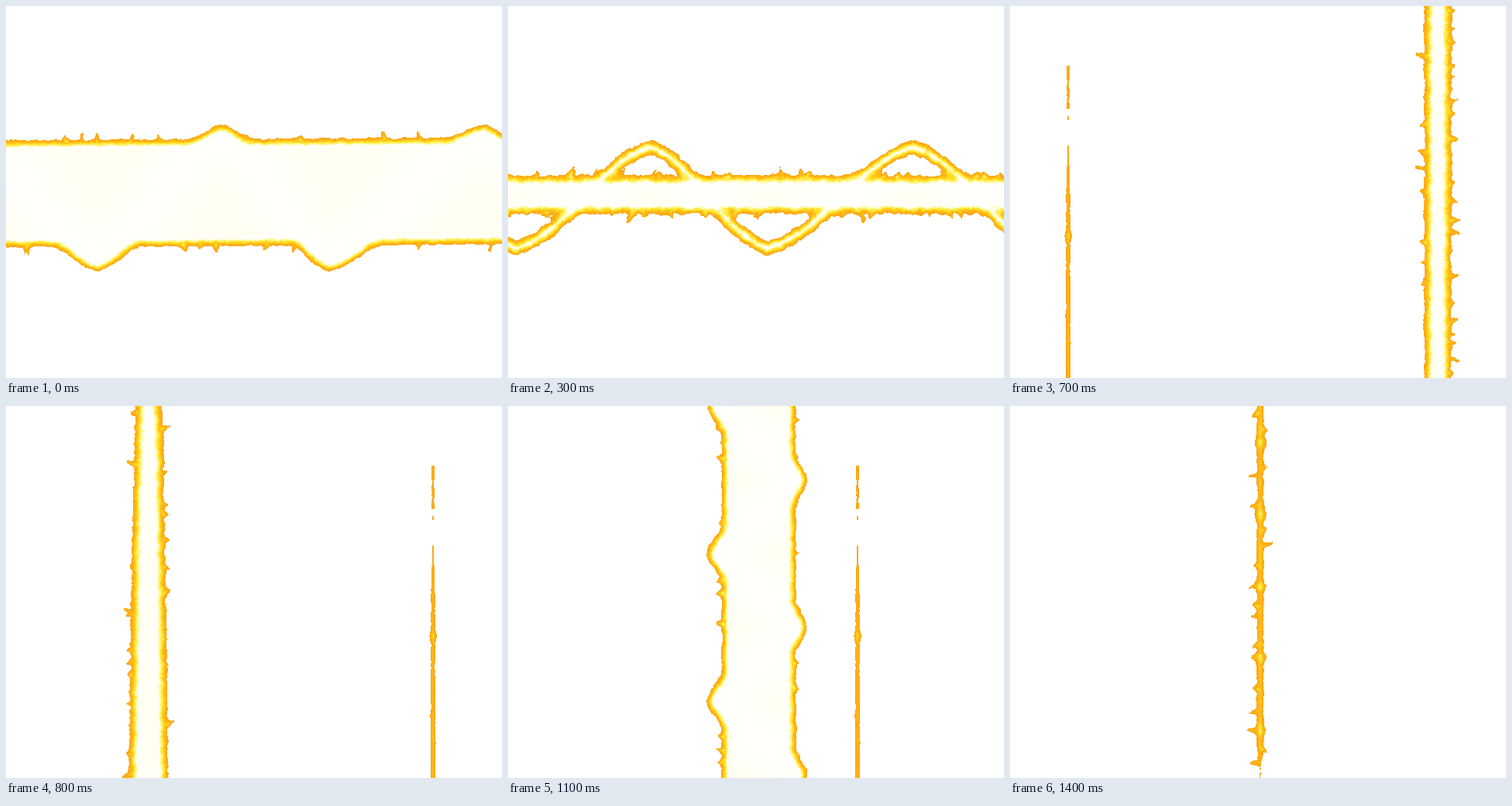
Animation, 640 px wide and 480 px high, one loop 1500 ms. Source, as an HTML page with a canvas:

```html
<!DOCTYPE html>
<html>
<head>
<meta charset="utf-8">
<title>Energy beams</title>
<style>
html, body { margin: 0; width: 100%; height: 100%; overflow: hidden; background: #fff; }
canvas { display: block; width: 640px; height: 480px; }
</style>
</head>
<body>
<canvas id="stage" width="640" height="480"></canvas>
<script>
const W = 640, H = 480, STEP = 100, STEPS = 15, REACH = 120;
const ctx = document.getElementById('stage').getContext('2d');

const lerp = (a, b, t) => a + (b - a) * t;
const clamp01 = x => Math.max(0, Math.min(1, x));
const bell = x => Math.exp(-x * x);

function hash(x, y, seed) {
  let h = Math.imul(x, 374761393) + Math.imul(y, 668265263) + Math.imul(seed, 974711);
  h = Math.imul(h ^ (h >>> 13), 1274126177);
  return ((h ^ (h >>> 16)) >>> 0) / 4294967296;
}

function noise(x, y, seed) {
  const ix = Math.floor(x), iy = Math.floor(y);
  const fx = x - ix, fy = y - iy;
  const u = fx * fx * (3 - 2 * fx), v = fy * fy * (3 - 2 * fy);
  return lerp(lerp(hash(ix, iy, seed), hash(ix + 1, iy, seed), u),
              lerp(hash(ix, iy + 1, seed), hash(ix + 1, iy + 1, seed), u), v);
}

// Union of two depths with a rounded joint
function blend(a, b, k) {
  const h = Math.max(k - Math.abs(a - b), 0) / k;
  return Math.max(a, b) + h * h * k / 4;
}

// Regular swellings along a beam
const swell = (s, first, gap, width) =>
  bell(((s - first + gap * 10.5) % gap - gap / 2) / width);

// Wave through crests that alternate in side, with its slope
function wavePoint({ crests, amp, lift }, s) {
  let i = 0;
  while (i < crests.length - 2 && s > crests[i + 1]) i++;
  const span = crests[i + 1] - crests[i];
  const t = clamp01((s - crests[i]) / span);
  const sign = i % 2 ? 1 : -1;
  const y = lerp(Math.cos(Math.PI * t), 1 - 2 * t, 0.35);
  return [lift + sign * amp * y, 1.8 * amp / span * (0.5 + Math.sin(Math.PI * t))];
}

// Coordinates: s runs along a beam, v across it
const beam = o => ({ mid: 0, tilt: 0, ramp: 9, rough: 5, seed: 1, spikes: 24, ...o });

function mix(a, b, t) {
  const m = { ...b };
  for (const k in a) if (typeof a[k] === 'number') m[k] = lerp(a[k], b[k], t);
  m.seed = Math.round(m.seed);
  m.crests = a.crests.map((c, i) => lerp(c, b.crests[i], t));
  return m;
}

const makeSpikes = ({ spikes, seed }) => Array.from({ length: spikes }, (_, i) => ({
  s: (i + hash(i, 1, seed)) / spikes * W,
  side: hash(i, 2, seed) < 0.5 ? -1 : 1,
  length: 4 + 8 * hash(i, 3, seed) ** 2,
  width: 2 + 2.5 * hash(i, 4, seed),
  lean: hash(i, 5, seed) - 0.5
}));

const wideRow = beam({
  half: 69, mid: -1, tilt: -4 / W, ramp: 8, seed: 3, rough: 4,
  crests: [-50, 117, 277, 417, 615, 750], amp: 82, lift: 4, stroke: 12
});
const slimRow = beam({
  half: 25, seed: 6, rough: 6, spikes: 40,
  crests: [-150, 10, 183, 334, 523, 690], amp: 65, lift: 4, stroke: 8.5
});
const lastRow = beam({ half: s => 5 + 4 * swell(s, 66, 168, 7), seed: 8 });
const rows = [wideRow, mix(wideRow, slimRow, 1 / 3), mix(wideRow, slimRow, 2 / 3),
              slimRow, lastRow];

const column = [
  beam({ half: s => 16.5 + 9 * Math.pow(s / H, 0.6), mid: -0.5, ramp: 10, seed: 21 }),
  beam({ half: 17.5, mid: 0.5, ramp: 9.5, seed: 24, spikes: 36 }),
  beam({
    half: s => s > 205 ? 2.2 + (s - 205) / 250 + 2 * bell((s - 297) / 8)
      : s > 72 && noise(s / 8, 0, 5) > 0.5 ? 1.5 : -9,
    mid: -0.5, rough: 2, seed: 27, spikes: 0
  })
];

const evenCrests = Array.from({ length: 7 }, (_, i) => i * 95);
const wideCol = beam({
  half: 48, mid: 1, ramp: 8, seed: 31, rough: 4,
  crests: evenCrests, amp: 52, lift: -1, stroke: 12
});
const slimCol = beam({
  half: 20, mid: 0.5, seed: 33, rough: 6, spikes: 36,
  crests: evenCrests, amp: 60, lift: 0, stroke: 7.5
});
const lastCol = beam({
  half: s => Math.min(4.4, (479 - s) / 8) + 3 * swell(s, 140, 92.5, 7),
  mid: 0.3, rough: 3.5, ramp: 9.5, seed: 36
});
const finale = [wideCol, mix(wideCol, slimCol, 0.5), slimCol, lastCol];

// [position in the ramp, red, green, blue]
const RAMP = [[0, 252, 162, 16], [0.38, 255, 188, 26], [0.6, 255, 224, 34],
              [0.82, 255, 244, 110], [1.04, 255, 253, 222], [1.25, 255, 255, 252]];

function tint(t) {
  let i = 0;
  while (i < RAMP.length - 2 && t > RAMP[i + 1][0]) i++;
  const a = RAMP[i], b = RAMP[i + 1], k = clamp01((t - a[0]) / (b[0] - a[0]));
  return [1, 2, 3].map(c => lerp(a[c], b[c], k));
}

function paint(img, shape, center, across) {
  const length = across ? W : H, limit = across ? H : W;
  const from = Math.max(0, center - REACH), to = Math.min(limit, center + REACH);
  const spikes = makeSpikes(shape);
  for (let s = 0; s < length; s++) {
    const half = typeof shape.half === 'function' ? shape.half(s) : shape.half;
    const mid = shape.mid + shape.tilt * s;
    const near = spikes.filter(p => Math.abs(p.s - s) < 12);
    const [crest, slope] = shape.crests ? wavePoint(shape, s) : [0, 0];
    const steep = Math.hypot(1, slope);
    for (let p = from; p < to; p++) {
      const v = p - center;
      const out = Math.abs(v - mid) - half;
      let d = -out, ivory = 1;
      if (shape.crests) {
        const gap = Math.abs(v - crest) / steep;
        // The crests of a wide beam are solid
        const inside = half > 40 && v * crest > 0 && Math.abs(v) < Math.abs(crest);
        d = blend(d, (shape.stroke - (inside ? 0 : gap)) * 1.2, 12);
        ivory = clamp01((gap - 12) / 45);
      }
      for (const k of near) {
        if ((v - mid) * k.side <= 0 || out < -3 || out > k.length) continue;
        const thick = k.width * (1 - out / k.length) + 0.8;
        d = blend(d, thick - Math.abs(s - k.s - k.lean * out), 3);
      }
      if (d < -5) continue;
      if (d < 16) {
        const n = noise(s / 9, v / 9, shape.seed) * 0.55
                + noise(s / 3, v / 3, shape.seed + 50) * 0.45;
        d += (n - 0.5) * shape.rough;
      }
      if (d <= 0) continue;
      const t = d / shape.ramp, color = tint(t);
      color[2] -= 9 * ivory * clamp01((t - 1.2) * 2);
      const i = 4 * (across ? p * W + s : s * W + p);
      for (let c = 0; c < 3; c++) img.data[i + c] = color[c];
    }
  }
}

const tracks = [
  { stages: rows, start: 0, center: 243, across: true },
  { stages: column, start: 5, center: 75 },
  { stages: column, start: 6, center: 551 },
  { stages: column, start: 8, center: 184 },
  { stages: column, start: 9, center: 451 },
  { stages: finale, start: 11, center: 322 }
];

const pictures = Array.from({ length: STEPS }, (_, step) => {
  const img = ctx.createImageData(W, H);
  img.data.fill(255);
  for (const { stages, start, center, across } of tracks) {
    const shape = stages[step - start];
    if (shape) paint(img, shape, center, across);
  }
  return img;
});

const begin = performance.now();
let shown = -1;
function draw() {
  const step = Math.floor((performance.now() - begin) / STEP) % STEPS;
  if (step !== shown) ctx.putImageData(pictures[shown = step], 0, 0);
  requestAnimationFrame(draw);
}
draw();
</script>
</body>
</html>
```
